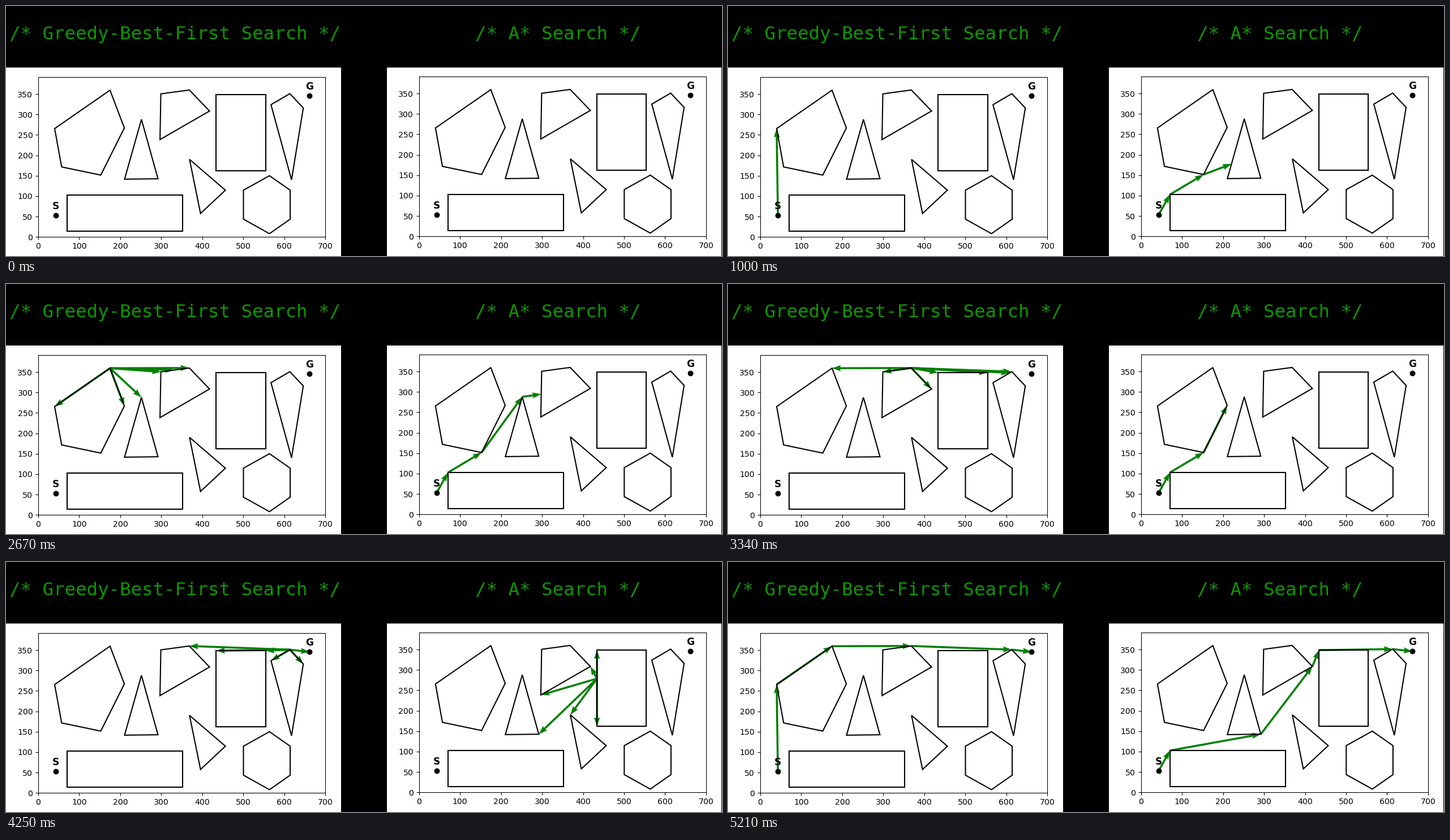
Recreate the animation shown at these times as a matplotlib script. Size 1265x443 px, loop 5.51 s.

```python
import math

import numpy as np
import matplotlib.pyplot as plt
from matplotlib.animation import FuncAnimation
from matplotlib.patches import Polygon, Rectangle

W, H, DPI = 1265, 443, 100
FRAMES, STEP = 145, 38  # 5510 ms
START, GOAL = (43, 53), (662, 345.5)


def box(x0, y0, x1, y1):
    return [(x0, y1), (x1, y1), (x1, y0), (x0, y0)]


def hexagon(x0, x1, apex, y, shoulder, tip):
    return [(apex, y + tip), (x1, y + shoulder), (x1, y - shoulder),
            (apex, y - tip), (x0, y - shoulder), (x0, y + shoulder)]


# Convex obstacles, corners listed clockwise
OBSTACLES = [
    [(40, 265.5), (175, 359.5), (210, 267), (152.5, 151.5), (57, 171.5)],
    [(251.7, 288), (292, 142.5), (210.5, 141.5)],
    [(299, 350.5), (368.5, 360), (417.8, 308.5), (297, 238.5)],
    [(567.7, 324), (613.7, 351), (646.5, 316), (617.8, 140)],
    [(369, 190), (456.5, 114.5), (395.8, 57.5)],
    box(434, 162, 554.5, 348.5),
    box(70.5, 13.5, 352.7, 102.5),
    hexagon(500.5, 614.5, 564, 79, 35.5, 71),
]
CORNERS = [START, GOAL] + [p for poly in OBSTACLES for p in poly]


def entry(p, q, poly, shrink):
    """Fraction of p-q at which it enters the slightly shrunk polygon."""
    p, poly = np.array(p), np.array(poly)
    d, lo, hi = np.array(q) - p, 0.0, 1.0
    for v, w in zip(poly, np.roll(poly, -1, axis=0)):
        edge = (w - v) / math.dist(v, w)
        normal = np.array([-edge[1], edge[0]])
        room, speed = normal @ (v - p) - shrink, normal @ d
        if abs(speed) < 1e-9:
            if room < 0:
                return None
        elif speed > 0:
            hi = min(hi, room / speed)
        else:
            lo = max(lo, room / speed)
    return lo if lo < hi - 1e-6 else None


def hits(p, q, shrink):
    found = (entry(p, q, poly, shrink) for poly in OBSTACLES)
    return [t for t in found if t is not None]


def sight(p):
    """Where the straight line to the goal first meets an obstacle."""
    t = min(hits(p, GOAL, 0.01), default=0)
    if t * math.dist(p, GOAL) < 3:
        return None
    return tuple(round(float(a + t * (b - a)), 6) for a, b in zip(p, GOAL))


def neighbours(p):
    ends = [q for q in CORNERS if math.dist(p, q) > 1 and not hits(p, q, 0.5)]
    ahead = sight(p)
    return ends + [ahead] if ahead else ends


def search(weight):
    """Arrow sets: the route to each visited node, then its neighbours.

    Nodes are ranked by weight * cost so far + distance to the goal.
    """
    cost, parent = {START: 0}, {}
    frontier, done, phases = {START}, set(), []
    while True:
        node = min(frontier,
                   key=lambda p: weight * cost[p] + math.dist(p, GOAL))
        route, p = [], node
        while p in parent:
            route.append((parent[p], p))
            p = parent[p]
        phases.append(route)
        if node == GOAL:
            return phases
        frontier.remove(node)
        done.add(node)
        ends = neighbours(node)
        phases.append([(node, q) for q in ends])
        for q in ends:
            c = cost[node] + math.dist(node, q)
            if q not in done and c < cost.get(q, math.inf):
                cost[q], parent[q] = c, node
                frontier.add(q)


GREEDY, ASTAR = search(0), search(1)


def greedy_phase(t):
    return (t - 300) / 490 + 1


def astar_phase(t):
    # Slow start, brisk middle, slow finish
    return np.interp(t, [80, 985, 3310, 5150], [1, 10, 38, 56], left=0)


fig = plt.figure(figsize=(W / DPI, H / DPI), dpi=DPI, facecolor="black")


def panel(x, width, left, top, title, title_x):
    fig.add_artist(Rectangle((x / W, 0), width / W, (H - 109) / H,
                             color="white", lw=0, zorder=-1))
    fig.text(title_x / W, 1 - 58.5 / H, title, color="#0d9600", size=23.3,
             family="DejaVu Sans Mono", ha="center", va="baseline")
    ax = fig.add_axes([left / W, 1 - (top + 283) / H, 507 / W, 283 / H])
    ax.set(xlim=(0, 700), ylim=(0, 391.3),
           xticks=range(0, 701, 100), yticks=range(0, 351, 50))
    ax.tick_params(labelsize=10.2)
    for poly in OBSTACLES:
        ax.add_patch(Polygon(poly, fill=False, ec="black", lw=1.5, zorder=2))
    for name, (px, py) in zip("SG", (START, GOAL)):
        ax.plot(px, py, "ko", ms=6.1)
        ax.text(px, py + 15.5, name, size=12.2, weight="bold",
                ha="center", va="baseline")
    return ax


axes = [panel(0, 592, 57, 126.2, "/* Greedy-Best-First Search */", 299),
        panel(673, 591, 729.8, 125.2, "/* A* Search */", 975)]
shown = [None, None]


def draw_arrows(i, phases, k):
    if shown[i] is not None:
        shown[i].remove()
        shown[i] = None
    arrows = phases[min(max(math.floor(k), 0), len(phases) - 1)]
    if arrows:
        a = np.array(arrows)
        tail, vec = a[:, 0], a[:, 1] - a[:, 0]
        shown[i] = axes[i].quiver(
            *tail.T, *vec.T, color="green", width=0.007, headlength=4.4,
            headaxislength=4, angles="xy", scale_units="xy", scale=1)


def update(n):
    t = (n + 0.5) * STEP
    draw_arrows(0, GREEDY, greedy_phase(t))
    draw_arrows(1, ASTAR, astar_phase(t))
    return []


anim = FuncAnimation(fig, update, frames=FRAMES, interval=STEP,
                     repeat=True, repeat_delay=0)
plt.show()
```
